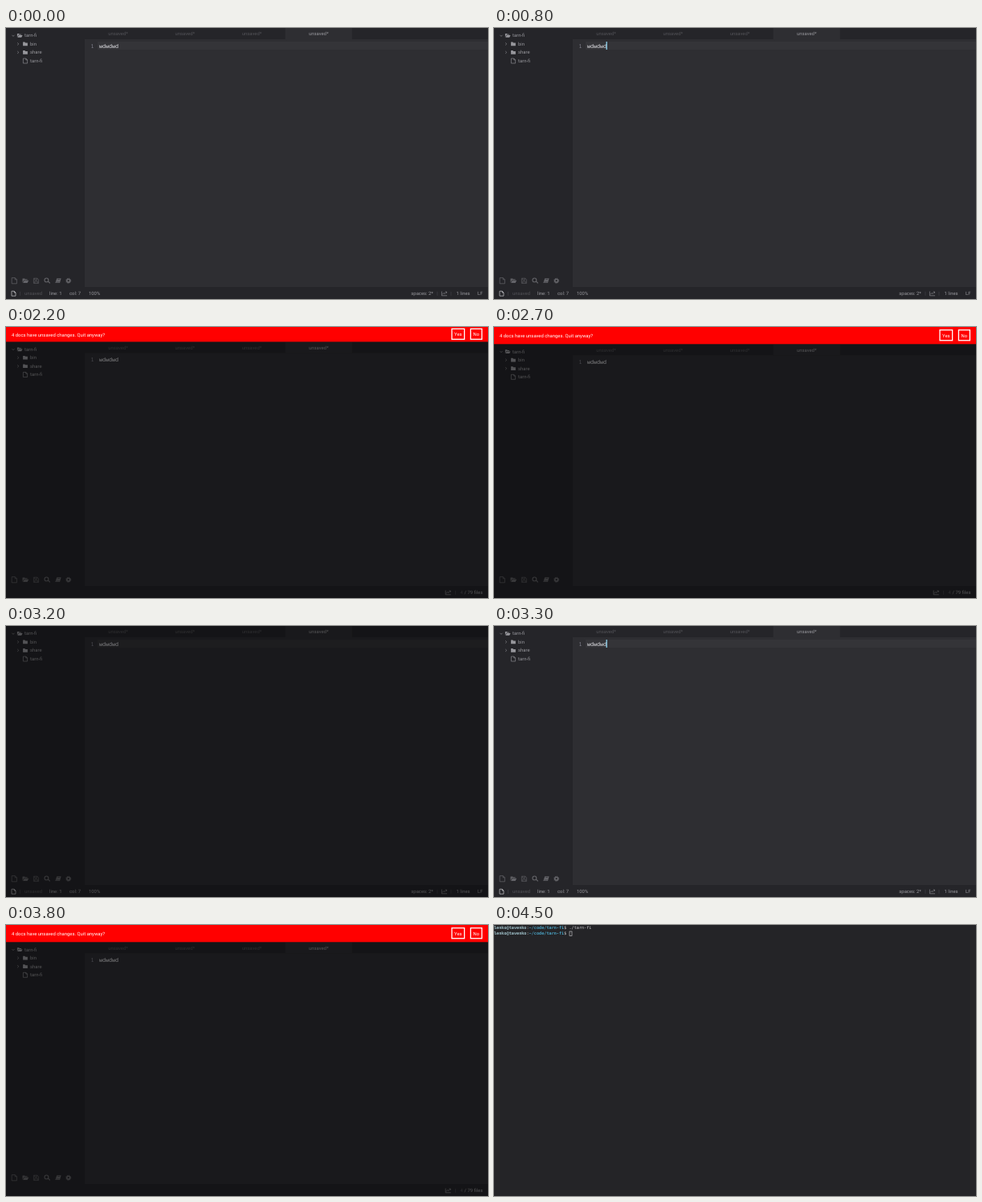
These frames come from a looping animation (600 px wide and 338 px high, 5.2 s). An HTML page:

```html
<!DOCTYPE html>
<html lang="en">
<head>
<meta charset="utf-8">
<title>Editor quit prompt</title>
<style>
  html, body { margin: 0; width: 100%; height: 100%; overflow: hidden; background: #242427; }
  svg { display: block; width: 100vw; height: 100vh; }
  text { font: 5.9px Roboto, sans-serif; fill: #97979c; text-rendering: geometricPrecision; }
  .dim { fill: #525257; }
  .code { font: 6.65px "Noto Sans Mono", monospace; }
  .term text { font: 5.18px "DejaVu Sans Mono", monospace; fill: #d0d0d2; }
  .host { fill: #a3c6cf; font-weight: bold; }
  .path { fill: #4aa3c4; font-weight: bold; }
  .line { fill: none; stroke: #97979c; stroke-width: .6; }
  .solid { fill: #97979c; }
  #bar text { fill: #fff; }
  .button { fill: none; stroke: #fff; stroke-width: 1.3; }
</style>
</head>
<body>
<svg viewBox="0 0 600 338" preserveAspectRatio="none">
  <defs>
    <path id="file" class="line" d="M-2.6-3H.8L2.6-1.2V3H-2.6ZM.8-3V-1.2H2.6"/>
    <path id="folder" class="solid" d="M-2.9-2.4H-.6L.2-1.5H2.9V2.3H-2.9Z"/>
    <path id="open" class="solid" d="M-3 2.2V-2.4H-.8L0-1.6H2.2V-.8H-1.4ZM-2.5 2.4-1.1-.3H3.7L2.3 2.4Z"/>
    <path id="chart" class="line" d="M-3.2-2.7V2.6H3.4M-2.2 1-.6-.8.6.3 2.8-2M1.2-2.2H2.9V-.5"/>
  </defs>

  <g class="term">
    <rect width="600" height="338" fill="#242427"/>
    <g id="prompts"></g>
    <rect x="94" y="8" width="3" height="5.4" fill="none" stroke="#d0d0d2" stroke-width=".6"/>
  </g>

  <g id="editor">
    <rect width="600" height="338" fill="#252529"/>
    <rect x="98" width="502" height="323" fill="#2e2e32"/>
    <g id="top">
      <g id="tabs"></g>
      <rect id="row" x="114" y="17" width="486" height="10" fill="#343438"/>
      <text class="code" x="105.6" y="24.6" style="fill:#83838f">1</text>
      <text class="code" x="116" y="24.6" style="fill:#e1e1e6">wdwdwd</text>
      <rect id="caret" x="139.6" y="17" width="1.2" height="10" fill="#93ddfa"/>
      <g id="tree"></g>
    </g>

    <g transform="translate(0 315.2)" opacity=".55">
      <use href="#file" transform="translate(10.3 0) scale(1.2)"/>
      <use href="#open" transform="translate(24 0) scale(1.15)"/>
      <path class="line" d="M34.4-3H39L40.6-1.4V3.2H34.4ZM35.8-3V-.9H38.6V-3M35.8 3.2V.8H39.2V3.2"/>
      <path class="line" style="stroke-width:1.1" d="M52.4.8 54.8 3.2"/>
      <circle class="line" style="stroke-width:1.1" cx="50.4" cy="-.8" r="2.4"/>
      <path class="solid" d="M63.3-3H68.6L67 2.8H61.3ZM62.2 1.6V2.1H66.6L66.8 1.6ZM64.3-1.7V-1.2H67L67.1-1.7Z" fill-rule="evenodd"/>
      <circle class="line" style="stroke-width:1.6" cx="77.7" r="1.9"/>
      <circle class="line" style="stroke-width:1;stroke-dasharray:1.2 1.16" cx="77.7" r="3"/>
    </g>

    <g id="status"></g>
    <g id="promptStatus"></g>
    <rect id="shade" width="600" height="338" fill-opacity=".45"/>

    <g id="bar">
      <rect id="red" width="600" fill="#f00"/>
      <g id="message">
        <text x="7" y="2.3">4 docs have unsaved changes. Quit anyway?</text>
        <rect class="button" x="555" y="-6.9" width="15.6" height="13"/>
        <text x="562.8" y="1.9" text-anchor="middle">Yes</text>
        <rect class="button" x="578.4" y="-6.9" width="14" height="13"/>
        <text x="585.4" y="1.9" text-anchor="middle">No</text>
        <rect id="underline" y="3.5" height=".9" fill="#fff"/>
      </g>
    </g>
  </g>
</svg>
<script>
const $ = id => document.getElementById(id);
const label = (x, cy, s, cls = '') => `<text x="${x}" y="${cy + 2}" class="${cls}">${s}</text>`;
const icon = (id, x, y) => `<use href="#${id}" x="${x}" y="${y}"/>`;
const chevron = (x, y, turn) =>
  `<path class="line" d="M-1.5-.8 0 .8 1.5-.8" transform="translate(${x} ${y}) rotate(${turn})"/>`;

const project = 'tarn-fi';

$('prompts').innerHTML = [[5.4, './' + project], [12.2, '']].map(([y, cmd]) =>
  `<text y="${y}"><tspan class="host">lenko@tavenko</tspan>:<tspan class="path">~/code/${project}</tspan>$ ${cmd}</text>`
).join('');

$('tabs').innerHTML = '<rect x="98" width="502" height="14" fill="#252529"/>' +
  '<rect x="347.6" width="83.2" height="14" fill="#2e2e32"/>' +
  [0, 1, 2, 3].map(i =>
    `<text x="${139.6 + i * 83.2}" y="9.3" text-anchor="middle" class="${i < 3 ? 'dim' : ''}">unsaved*</text>`
  ).join('');

$('tree').innerHTML =
  chevron(9, 9.6, 0) + icon('open', 16.9, 9.4) + label(23, 9.4, project) +
  ['bin', 'share'].map((name, i) => {
    const y = 19.9 + i * 10.5;
    return chevron(15, y, -90) + icon('folder', 24, y) + label(30, y, name);
  }).join('') +
  icon('file', 24, 41) + label(30, 41, project);

const y = 331.2;
$('status').innerHTML =
  `<path class="line" style="stroke:#e1e1e6" d="M7 328.2H10.2L12 330V334.2H7ZM10.2 328.2V330H12"/>` +
  label(16.7, y, '|', 'dim') + label(23, y, 'unsaved', 'dim') + label(54, y, 'line: 1') +
  label(79, y, 'col: 7') + label(103, y, '100%') + label(504.3, y, 'spaces: 2*') +
  label(536.2, y, '|', 'dim') + icon('chart', 545.6, y) + label(553.3, y, '|', 'dim') +
  label(560.6, y, '1 lines') + label(587, y, 'LF');
$('promptStatus').innerHTML =
  icon('chart', 550.4, y) + label(565.6, y, '4', 'dim') +
  label(566 - 7.4, y, '|', 'dim') + label(570.6, y, '/ 79 files');

const show = (id, on) => $(id).setAttribute('display', on ? 'inline' : 'none');
const within = (t, a, b) => t >= a && t < b;

function draw(ms) {
  const t = Math.floor(ms / 100) * 100;   // the screen refreshes ten times a second
  const first = within(t, 2200, 3200), second = t >= 3500;
  const asking = first || second;
  const age = first ? t - 2100 : t - 3430;
  const h = asking ? 21.3 * (1 - Math.exp(-age / 50)) : 0;

  $('top').setAttribute('transform', `translate(0 ${h})`);
  $('red').setAttribute('height', h);
  $('message').setAttribute('transform', `translate(0 ${h / 2})`);
  show('bar', asking);
  show('row', !asking);
  show('status', !asking);
  show('promptStatus', asking);
  show('shade', asking || t === 3200);
  show('caret', within(t, 800, 1200) || within(t, 1600, 1900) || within(t, 3300, 3500));

  // the chosen button is underlined from its centre outwards
  const [x, from] = first ? [585.4, 2900] : [562.8, 3800];
  const w = asking ? 10 * Math.min(1, Math.max(0, (t - from) / 100)) : 0;
  $('underline').setAttribute('x', x - w / 2);
  $('underline').setAttribute('width', w);

  $('editor').setAttribute('opacity', t < 4300 ? 1 : t < 4400 ? .55 : t < 4500 ? .2 : 0);
}

const start = performance.now();
function tick() {
  draw((performance.now() - start) % 5200);
  requestAnimationFrame(tick);
}
tick();
</script>
</body>
</html>
```
